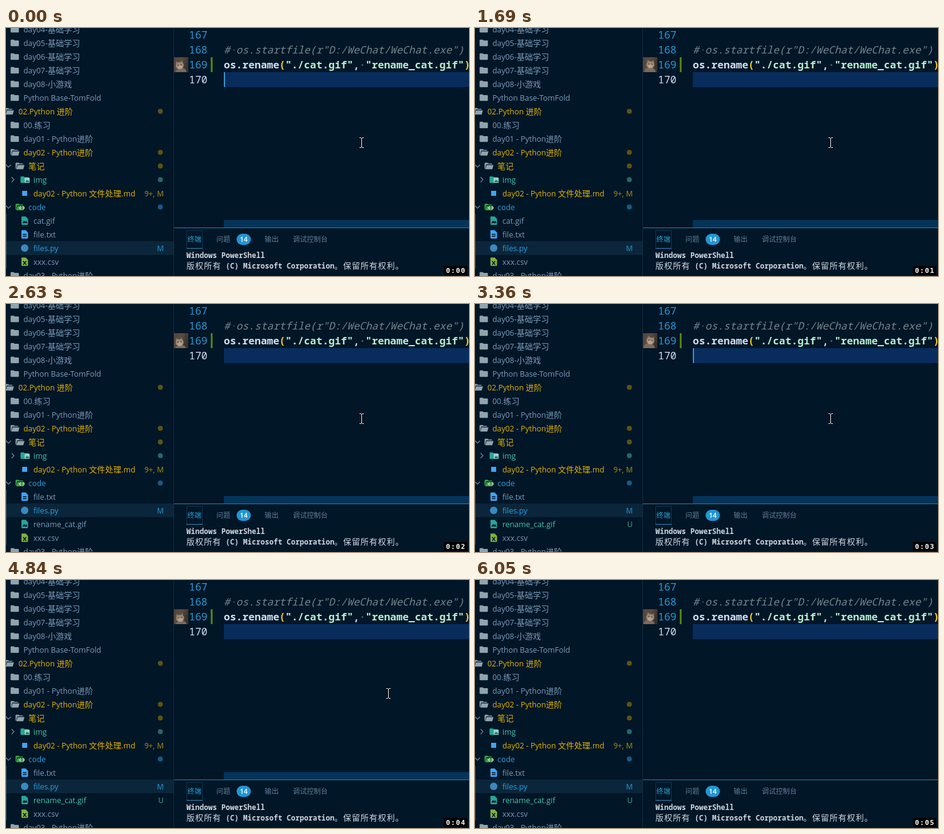
An HTML page that plays this animation: 744 px wide and 399 px high, repeating every 6.15 s.

```html
<!DOCTYPE html>
<html lang="zh">
<head>
<meta charset="utf-8">
<title>Renaming a file</title>
<style>
html, body { margin: 0; width: 100%; height: 100%; overflow: hidden; background: #011627; }
svg { display: block; width: 744px; height: 399px; }
text { white-space: pre; }
.ui { font: 12.4px "Open Sans", "Noto Sans CJK SC", sans-serif; }
.ui .cjk { font-size: 13px; }
.badge { font: 600 12px "Open Sans", sans-serif; text-anchor: end; }
.code { font: 500 16.5px "Noto Sans Mono", monospace; fill: #d0e0f2; }
.call { font-weight: 600; }
.num { fill: #239cd6; }
.note { fill: #74868c; font-style: italic; }
.str { fill: #b5f0d0; }
.par { fill: #f5cf2a; }
.dim { fill: #4a6074; }
.tab { font: 11.2px "Noto Sans CJK SC", sans-serif; fill: #5f7e97; }
.tab .on { fill: #2b9fd5; }
.pill { font: 600 11px "Open Sans", sans-serif; fill: #fff; text-anchor: middle; }
.term { font: 600 11.67px "Noto Sans Mono", monospace; fill: #d0d9e2; }
.term .cjk { font: 13px "Noto Sans CJK SC", sans-serif; letter-spacing: 1px; }
.clock { font: bold 11px "DejaVu Sans Mono", monospace; letter-spacing: 1.4px; fill: #fff; }
.hide { display: none; }
.chev { fill: none; stroke: #6f90ac; stroke-width: 1.1; }
#after.tracked .new { fill: #43c5b0; }
#after:not(.tracked) .mark { display: none; }
</style>
</head>
<body>
<svg viewBox="0 0 744 399">
  <defs>
    <path id="folder" d="M.4 -4.2Q.4 -5.3 1.5 -5.3H5.4L6.8 -4H12.5Q13.7 -4 13.7 -2.8V4.2Q13.7 5.3 12.5 5.3H1.5Q.4 5.3 .4 4.2Z"/>
    <path id="open" d="M.4 4.2V-4.2Q.4 -5.3 1.5 -5.3H5.4L6.8 -4H11.5Q12.6 -4 12.6 -2.7H3L1.7 2.8V4.2ZM3.6 -1.6H14.7L13 4.4Q12.7 5.3 11.8 5.3H1.6Z"/>
    <path id="file" d="M1.9 -6.7H7.6L11.4 -2.7V5.6Q11.4 6.7 10.3 6.7H1.9Q.8 6.7 .8 5.6V-5.6Q.8 -6.7 1.9 -6.7Z"/>
    <path id="beam" d="M-3 -7.5H-1L.5 -6.5L2 -7.5H4M.5 -6.5V7.5M-3 8.5H-1L.5 7.5L2 8.5H4" fill="none"/>
    <linearGradient id="room" x2="1" y2=".4">
      <stop stop-color="#51443b"/><stop offset=".5" stop-color="#5b4c41"/><stop offset="1" stop-color="#3a312d"/>
    </linearGradient>
    <clipPath id="frame"><rect x="270" y="47" width="23" height="24"/></clipPath>
  </defs>

  <rect width="744" height="399" fill="#011627"/>
  <g id="tree"></g>
  <g id="before"></g>
  <g id="after"></g>
  <path d="M.5 299V387" stroke="#35495a"/>
  <path d="M269.5 0V399" stroke="#122d42"/>

  <rect x="350" y="71" width="394" height="24" fill="#082c5c"/>
  <rect x="329" y="47" width="3" height="24" fill="#4c8512"/>
  <g class="code">
    <g class="num">
      <text x="294" y="17">167</text>
      <text x="294" y="41">168</text>
      <text x="294" y="65">169</text>
    </g>
    <text x="294" y="89">170</text>
    <text class="note" x="350" y="41">#<tspan class="dim">·</tspan>os.startfile(r"D:/WeChat/WeChat.exe")</text>
    <text class="call" x="350" y="65">os.rename<tspan class="par">(</tspan><tspan class="str">"./cat.gif"</tspan>,<tspan class="dim">·</tspan><tspan class="str">"rename_cat.gif"</tspan><tspan class="par">)</tspan></text>
  </g>
  <rect id="caret" x="350" y="71" width="2" height="24" fill="#3596cf"/>

  <g clip-path="url(#frame)">
    <rect x="270" y="47" width="23" height="24" fill="url(#room)"/>
    <g id="cat">
      <ellipse cy="11" rx="9" ry="7" fill="#7b6b5d"/>
      <path d="M-6 -2L-5 -8L-1 -5H2L5 -8L6 -1Z" fill="#857464"/>
      <ellipse rx="6.5" ry="5.5" fill="#9a8876"/>
      <ellipse cy="2.5" rx="4" ry="3" fill="#b3a28f"/>
      <circle cx="-2.5" cy="-1" r="1" fill="#54463d"/>
      <circle cx="2.5" cy="-1" r="1" fill="#54463d"/>
    </g>
  </g>

  <rect id="bar" x="350" y="309" width="394" height="12" fill="#04345a"/>
  <path d="M270 321.5H744" stroke="#2a7fa8"/>
  <path d="M290.5 355V325.5H315.5V355" fill="none" stroke="#12364e"/>
  <path d="M290 354.5H316" stroke="#2a8ab5"/>
  <g class="tab">
    <text class="on" x="291.5" y="344">终端</text>
    <text x="338" y="344">问题</text>
    <text x="415.5" y="344">输出</text>
    <text x="461" y="344">调试控制台</text>
  </g>
  <rect x="370.5" y="331" width="23" height="18" rx="9" fill="#2196d3"/>
  <text class="pill" x="382" y="344">14</text>
  <g class="term">
    <text x="290" y="370">Windows PowerShell</text>
    <text id="rights" x="290" y="387"></text>
  </g>

  <g id="mouse">
    <use href="#beam" stroke="#000" stroke-width="2.4"/>
    <use href="#beam" stroke="#fff"/>
  </g>

  <rect x="704" y="383" width="37" height="14" fill="#000"/>
  <text id="clock" class="clock" x="707" y="394">0:00</text>
</svg>
<script>
const $ = id => document.getElementById(id);
const GREY = '#7c9cba', GOLD = '#e3b400', BLUE = '#2b9fdc', TEAL = '#43c5b0';
const SLATE = '#90a4ae', SKY = '#42a5f5', SEA = '#26a69a', LEAF = '#7cb342';
const OLIVE = '#5d5313', PINE = '#23696d', NAVY = '#155c88';

const mixed = s => s.replace(/[\u3000-\u9fff]+/g, '<tspan class="cjk">$&</tspan>');
const label = (x, y, s, color, cls = '') =>
  `<text class="ui" x="${x}" y="${y + 4.5}"><tspan class="${cls}" fill="${color}">${mixed(s)}</tspan></text>`;
const shape = (id, x, y, color) => `<use href="#${id}" x="${x}" y="${y}" fill="${color}"/>`;
const dot = (y, color) => `<circle cx="248" cy="${y}" r="4" fill="${color}"/>`;
const badge = (y, s, color, cls = '') =>
  `<text class="badge ${cls}" x="253.5" y="${y + 4.5}" fill="${color}">${s}</text>`;
const chevron = (x, y, down) =>
  `<path class="chev" d="${down ? `M${x - 4} ${y - 2}l4 4l4 -4` : `M${x - 2} ${y - 4}l4 4l-4 4`}"/>`;
const line = (y, w) => `<path d="M27 ${y}h${w}" stroke="#011627" stroke-width="1.5"/>`;

// File rows of the "code" folder
const picture = y => shape('file', 24, y, SEA) + `<path d="M26 ${y + 4}l3 -4l2 2l1.5 -2l2 4z" fill="#011627"/>`;
const textFile = y => shape('file', 24, y, SKY) + line(y, 6) + line(y + 3, 6) + label(44, y, 'file.txt', GREY);
const sheet = y => shape('file', 24, y, LEAF) +
  `<path d="M27.5 ${y - 1}l5 6m0 -6l-5 6" stroke="#011627" stroke-width="1.4"/>` + label(44, y, 'xxx.csv', GREY);
const selected = y => `<rect y="${y - 11}" width="269" height="22" fill="#0b263b"/>
  <circle cx="30" cy="${y}" r="6" fill="#3c88bd"/>` + label(44, y, 'files.py', BLUE) + badge(y, 'M', '#237cb0');

const plain = ['day04-基础学习', 'day05-基础学习', 'day06-基础学习', 'day07-基础学习',
  'day08-小游戏', 'Python Base-TomFold', , '00.练习', 'day01 - Python进阶'];
let rows = '';
plain.forEach((s, i) => rows += shape('folder', 7, 2 + 22 * i, SLATE) + label(28, 2 + 22 * i, s, GREY));

$('tree').innerHTML = rows +
  shape('open', -2, 134, SLATE) + label(20, 134, '02.Python 进阶', GOLD) + dot(134, OLIVE) +
  shape('open', 7, 200, SLATE) + label(28, 200, 'day02 - Python进阶', GOLD) + dot(200, OLIVE) +
  chevron(4, 222, true) + shape('open', 15, 222, SLATE) + label(36, 222, '笔记', GOLD) + dot(222, OLIVE) +
  chevron(11, 244, false) + shape('folder', 23, 244, SEA) +
  `<path d="M30 241h8v8h-8z" fill="#8fd8ce"/><path d="M31 248l2.5 -4l2 2l1 -1l1 3z" fill="#12766d"/>` +
  label(44, 244, 'img', TEAL) + dot(244, PINE) +
  `<rect x="26" y="262" width="8" height="8" fill="${SKY}"/>` +
  label(44, 266, 'day02 - Python 文件处理.md', GOLD) + badge(266, '9+, M', '#877414') +
  chevron(4, 288, true) + shape('open', 15, 288, '#43a047') +
  `<path d="M24 287l-2.5 2.5l2.5 2.5m3 -5l2.5 2.5l-2.5 2.5" fill="none" stroke="#c8e6c9" stroke-width="1.3"/>` +
  label(36, 288, 'code', BLUE) + dot(288, NAVY) + sheet(376) +
  shape('folder', 7, 398, SLATE) + label(28, 398, 'day03 - Python进阶', GREY);

$('before').innerHTML = picture(310) + label(44, 310, 'cat.gif', GREY) + textFile(332) + selected(354);
$('after').innerHTML = textFile(310) + selected(332) + picture(354) +
  label(44, 354, 'rename_cat.gif', GREY, 'new') + badge(354, 'U', '#2b8279', 'mark');
$('rights').innerHTML = mixed('版权所有 (C) Microsoft Corporation。保留所有权利。');

const LOOP = 6150, STEPS = 46;
const BLINKS = [310, 890, 1410, 1840, 2510, 3000, 3480, 4050, 4570, 5080, 5630];
const SECONDS = [1110, 2090, 3130, 4150, 5230];
const PATH = [[0, 571, 184], [4840, 614, 182], [4960, 682, 214], [5080, 740, 254], [5230, 760, 270]];
const FADE = [[0, 1], [5230, .65], [5330, .3], [5480, 0]];
const passed = (times, t) => times.filter(x => x <= t).length;
const latest = (keys, t) => keys[passed(keys.map(k => k[0]), t) - 1];
const start = performance.now();

function draw() {
  const t = Math.max(0, performance.now() - start) % LOOP;
  const renamed = t >= 2630;
  $('before').classList.toggle('hide', renamed);
  $('after').classList.toggle('hide', !renamed);
  $('after').classList.toggle('tracked', t >= 3250);
  $('caret').classList.toggle('hide', passed(BLINKS, t) % 2 === 1);
  $('clock').textContent = '0:0' + passed(SECONDS, t);

  const [, x, y] = latest(PATH, t);
  $('mouse').setAttribute('transform', `translate(${x} ${y})`);
  $('bar').setAttribute('opacity', latest(FADE, t)[1]);

  // The thumbnail sways in coarse steps
  const s = Math.floor(t * STEPS / LOOP) * LOOP / STEPS / 1000;
  const cx = 281 + 2 * Math.sin(2.3 * s - 1), cy = 60.5 + 1.5 * Math.sin(3.1 * s);
  $('cat').setAttribute('transform', `translate(${cx} ${cy}) rotate(${10 * Math.sin(2.7 * s - 1.5)})`);
  requestAnimationFrame(draw);
}
draw();
</script>
</body>
</html>
```
